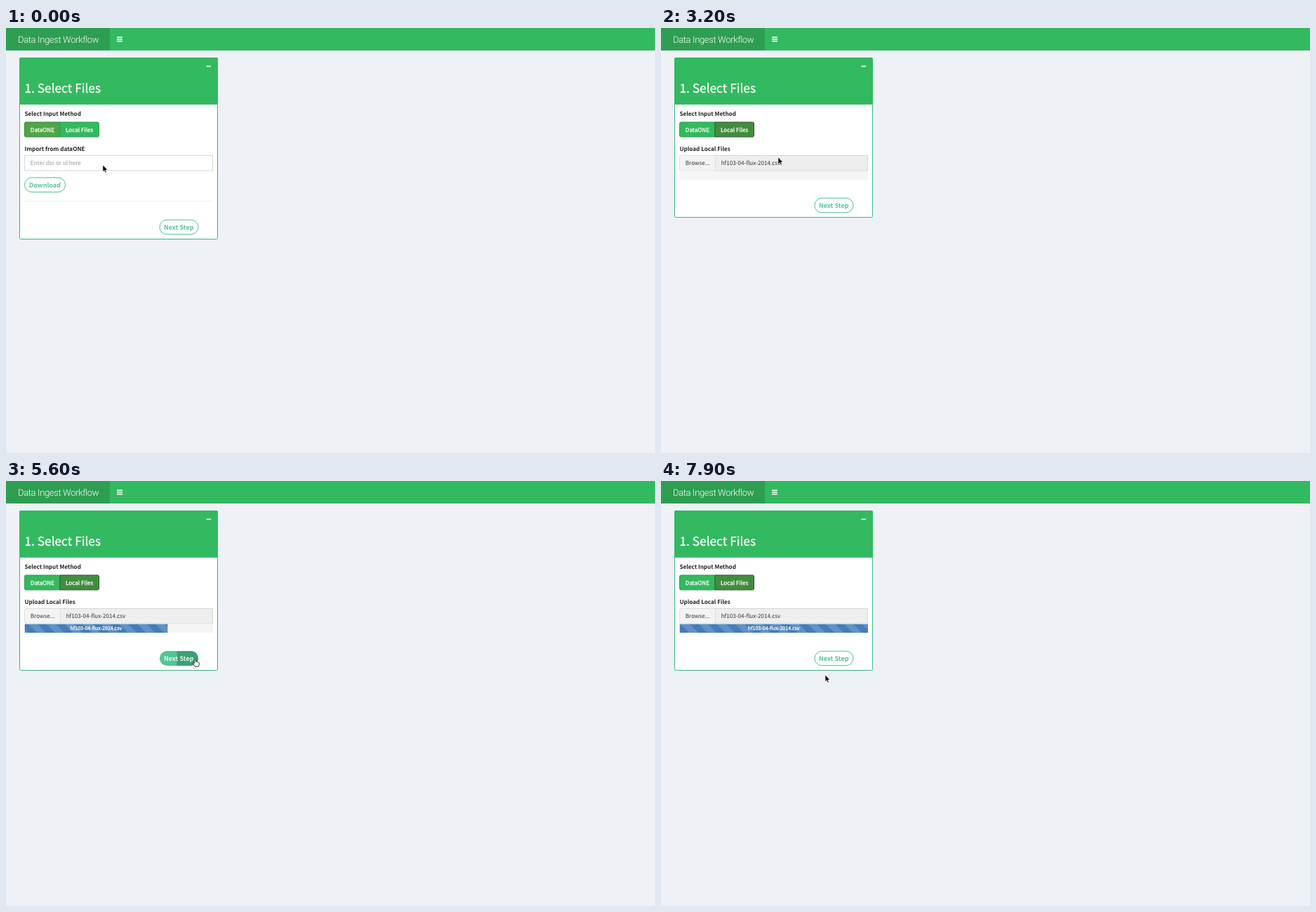
An HTML page for the animation above (8000 ms loop, 925 by 605 pixels).

```html
<!DOCTYPE html>
<html lang="en">
<head>
<meta charset="utf-8">
<title>Data Ingest Workflow</title>
<style>
html, body { margin: 0; width: 100%; height: 100%; overflow: hidden; background: #eef1f6; }
svg { display: block; width: 925px; height: 605px; }
text { font: 8.12px "Noto Sans CJK SC", "Noto Sans CJK JP", "Noto Sans", sans-serif; fill: #333; text-rendering: geometricPrecision; }
.b { font-weight: 700; fill: #222; }
.w { fill: #fff; stroke: #fff; stroke-width: .28px; }
.h1 { font-size: 17.3px; font-weight: 500; }
.logo { font: 300 13px Roboto, "Liberation Sans", sans-serif; letter-spacing: -.35px; fill: #fff; }
.pill { font-size: 9.05px; font-weight: 700; fill: #55c49a; text-anchor: middle; }
.ph { fill: #999; }
.small { font-size: 7.05px; text-anchor: middle; }
.tag { font: 500 8.2px Inter, "Liberation Sans", sans-serif; fill: #fff; text-anchor: middle; }
.line { fill: none; stroke: #4dbf93; }
</style>
</head>
<body>
<svg viewBox="0 0 925 605">
  <defs>
    <pattern id="stripes" width="25.9" height="13" patternUnits="userSpaceOnUse">
      <path d="M0 0H12.95L25.9 13H13Z" fill="#fff" fill-opacity=".16"/>
    </pattern>
    <clipPath id="pillClip"><rect x="219" y="242" width="55" height="21" rx="10.5"/></clipPath>
    <clipPath id="barClip"><rect id="barArea" x="26.5" y="203.5" height="12.5"/></clipPath>
    <linearGradient id="page" x2="0" y2="1">
      <stop stop-color="#fff" stop-opacity=".15"/><stop offset=".5" stop-color="#fafafa" stop-opacity=".85"/>
      <stop offset="1" stop-color="#eee" stop-opacity=".95"/>
    </linearGradient>
    <filter id="soft" x="-20%" y="-60%" width="140%" height="220%"><feGaussianBlur stdDeviation="1.6"/></filter>
  </defs>

  <rect width="925" height="32" fill="#33b960"/>
  <rect width="148" height="32" fill="#2d9e52"/>
  <text class="logo" x="17" y="20.6">Data Ingest Workflow</text>
  <path d="M158 13.2h8M158 16h8M158 18.8h8" stroke="#fff" stroke-width="1.5"/>

  <rect id="panel" x="19.5" y="42.5" width="282" rx="2" fill="#fff" stroke="#3bb483"/>
  <path d="M19 109V44q0-2 2-2H300q2 0 2 2V109Z" fill="#33b960"/>
  <path d="M285.6 54.5h6.4" stroke="#fff" stroke-width="1.7"/>
  <text class="w h1" x="26.5" y="92.3">1. Select Files</text>
  <text class="b" x="26.5" y="125.2">Select Input Method</text>
  <path id="left" d="M77 134H28.5q-2 0-2 2v17q0 2 2 2H77Z"/>
  <path id="right" d="M77 134h53.5q2 0 2 2v17q0 2-2 2H77Z"/>
  <text class="w" x="34.8" y="147.9">DataONE</text>
  <text class="w" x="85" y="147.9">Local Files</text>

  <g id="remote">
    <text class="b" x="26.5" y="174.9">Import from dataONE</text>
    <rect x="26.5" y="181.5" width="268" height="21.5" fill="#fff" stroke="#d2d6de"/>
    <text class="ph" x="34.8" y="195.4">Enter doi or id here</text>
    <rect class="line" x="26.5" y="213" width="58" height="20.5" rx="10.2"/>
    <text class="pill" x="55.4" y="227.1">Download</text>
    <path d="M26.5 246.5h268" stroke="#eee"/>
  </g>

  <g id="local">
    <text class="b" x="26.5" y="174.9">Upload Local Files</text>
    <rect id="glow" x="26" y="181" width="269" height="22.5" fill="none" stroke="#7cc46a" stroke-width="3" filter="url(#soft)"/>
    <rect x="77.5" y="181.5" width="217" height="21.5" fill="#eee" stroke="#d2d6de"/>
    <path d="M77.5 181.5H28.5q-2 0-2 2v17.5q0 2 2 2H77.5Z" fill="#f4f4f4" stroke="#ddd"/>
    <text x="34.8" y="195.4">Browse...</text>
    <text id="field" x="85.7" y="195.4"></text>
    <g id="track">
      <rect x="26.5" y="203.5" width="268.5" height="12.5" fill="#f5f5f5"/>
      <g clip-path="url(#barClip)">
        <rect x="26.5" y="203.5" width="268.5" height="12.5" fill="#447db9"/>
        <rect x="26.5" y="203.5" width="268.5" height="12.5" fill="url(#stripes)"/>
        <text id="barText" class="w small" y="212.4">hf103-04-flux-2014.csv</text>
      </g>
    </g>
  </g>

  <g id="next">
    <g id="hover" clip-path="url(#pillClip)">
      <rect x="219" y="242" width="55" height="21" fill="#52c596"/>
      <path id="sweep" d="M-70 242H3L-3 263H-70Z" fill="#3c9f74"/>
    </g>
    <rect id="rim" class="line" x="219" y="242.2" width="55" height="20.5" rx="10.2"/>
    <text id="nextText" class="pill" x="246.2" y="256.1">Next Step</text>
  </g>

  <g id="file">
    <path d="M-12 5H14L26 15V34.5H-12Z" fill="#555" opacity=".3" filter="url(#soft)"/>
    <path d="M-12 2H14L26 15V34H-12Z" fill="url(#page)"/>
    <path d="M14 5V15H26Z" fill="#fff" stroke="#ccc" stroke-width=".5"/>
    <text x="7" y="32.4" text-anchor="middle" style="font-size:5px;fill:#777">CSV</text>
    <rect x="-16" y="44" width="45" height="12" rx="2" fill="#3573d3"/>
    <rect x="-22.5" y="55" width="58.5" height="11" rx="2" fill="#3573d3"/>
    <text class="tag" x="6.5" y="53">hf103-04-</text>
    <text class="tag" x="6.5" y="63">flux-2014.csv</text>
  </g>
  <g id="cursor">
    <circle id="ring" cx=".5" cy="1" r="12.8" fill="#fff" fill-opacity=".25" stroke="#000" stroke-width="1.9"/>
    <path id="arrow" d="M0 0V9.6L2.2 7.7 3.6 10.9 5.2 10.2 3.8 7.1H6.7Z" fill="#000" stroke="#fff" stroke-width=".6"/>
    <path id="beam" d="M-2-5Q0-5 0-3.5Q0-5 2-5M0-3.5V3.5M-2 5Q0 5 0 3.5Q0 5 2 5M-1 1H1" fill="none" stroke="#222"/>
    <path id="hand" d="M1 1Q2-.6 3 1V4Q4.2 3.2 5 4.4Q6.2 3.8 6.8 5Q8 4.8 8 6V8.2L7 11H2.4L-.8 6.8Q-.8 5.2 1 6.2Z" fill="#fff" stroke="#000" stroke-width=".8"/>
  </g>
</svg>
<script>
const LOOP = 8000, PICK = 500, DRAG = 2000, DROP = 2800;
const el = id => document.getElementById(id);
const set = (id, attrs) => { for (const k in attrs) el(id).setAttribute(k, attrs[k]); };
const show = (id, on) => { el(id).style.display = on ? '' : 'none'; };
const move = (id, x, y) => set(id, { transform: `translate(${x} ${y})` });
const ease = u => u * u * (3 - 2 * u);
const same = u => u;

// Keys are [time, value, ...].
function along(keys, t, curve) {
  const i = keys.findIndex(k => k[0] > t);
  if (i < 0) return keys[keys.length - 1].slice(1);
  const a = keys[i - 1], b = keys[i], u = curve((t - a[0]) / (b[0] - a[0]));
  return a.slice(1).map((v, j) => v + (b[j + 1] - v) * u);
}

const path = [
  [0, 138, 195], [100, 138, 195], [400, 110, 146], [500, 110, 146], [900, 127.5, 223],
  [1000, 127.5, 223], [1600, 340, 640], [1900, 230, 640], [2400, 169, 178], [2700, 167, 184],
  [3800, 167, 184], [4300, 262, 286], [4800, 265, 254], [5500, 265, 254],
  [6200, 307, 239], [6500, 305, 240], [7200, 234, 276], [8000, 234, 276]
];
const upload = [[0, 0], [3300, 0], [5100, 177.5], [6200, 235.5], [6900, 268.5]];

function draw(t) {
  const picked = t >= PICK, dropped = t >= DROP, drag = t >= DRAG && !dropped;
  const [x, y] = along(path, t, ease), [w] = along(upload, t, same);

  set('panel', { height: picked ? 227 : 258 });
  show('remote', !picked);
  show('local', picked);
  set('left', picked ? { fill: '#33b960', stroke: '#2ca153' } : { fill: '#50a548', stroke: '#39843c' });
  set('right', picked ? { fill: '#438c3f', stroke: '#29592a' } : { fill: '#33b960', stroke: '#2ca153' });
  move('next', 0, picked ? 0 : 31);

  show('glow', drag);
  el('field').textContent = dropped ? 'hf103-04-flux-2014.csv' : 'Drag and drop files here';
  el('field').classList.toggle('ph', !dropped);
  show('track', dropped);
  set('barArea', { width: w });
  set('barText', { x: 26.5 + Math.max(w / 2, 37) });
  set('stripes', { patternTransform: `translate(${26.5 - t / 2000 * 25.9} 203.5)` });

  const over = t >= 4800 && t < 5700;
  show('hover', over);
  show('rim', !over);
  move('sweep', 219 + Math.max(0, t - 4900) / 200 * 27, 0);
  el('nextText').style.fill = over ? '#e2f5ec' : '';

  const hand = over || t >= 300 && t < 700, beam = t >= 700 && t < 1200;
  move('cursor', x, y);
  show('hand', hand);
  show('beam', beam);
  show('arrow', !hand && !beam);
  show('ring', drag || t >= 400 && t < 600);
  show('file', drag);
  move('file', x, y + 1);
}

function tick(now) {
  draw(Math.floor(now % LOOP / 100) * 100);
  requestAnimationFrame(tick);
}
draw(0);
requestAnimationFrame(tick);
</script>
</body>
</html>
```
